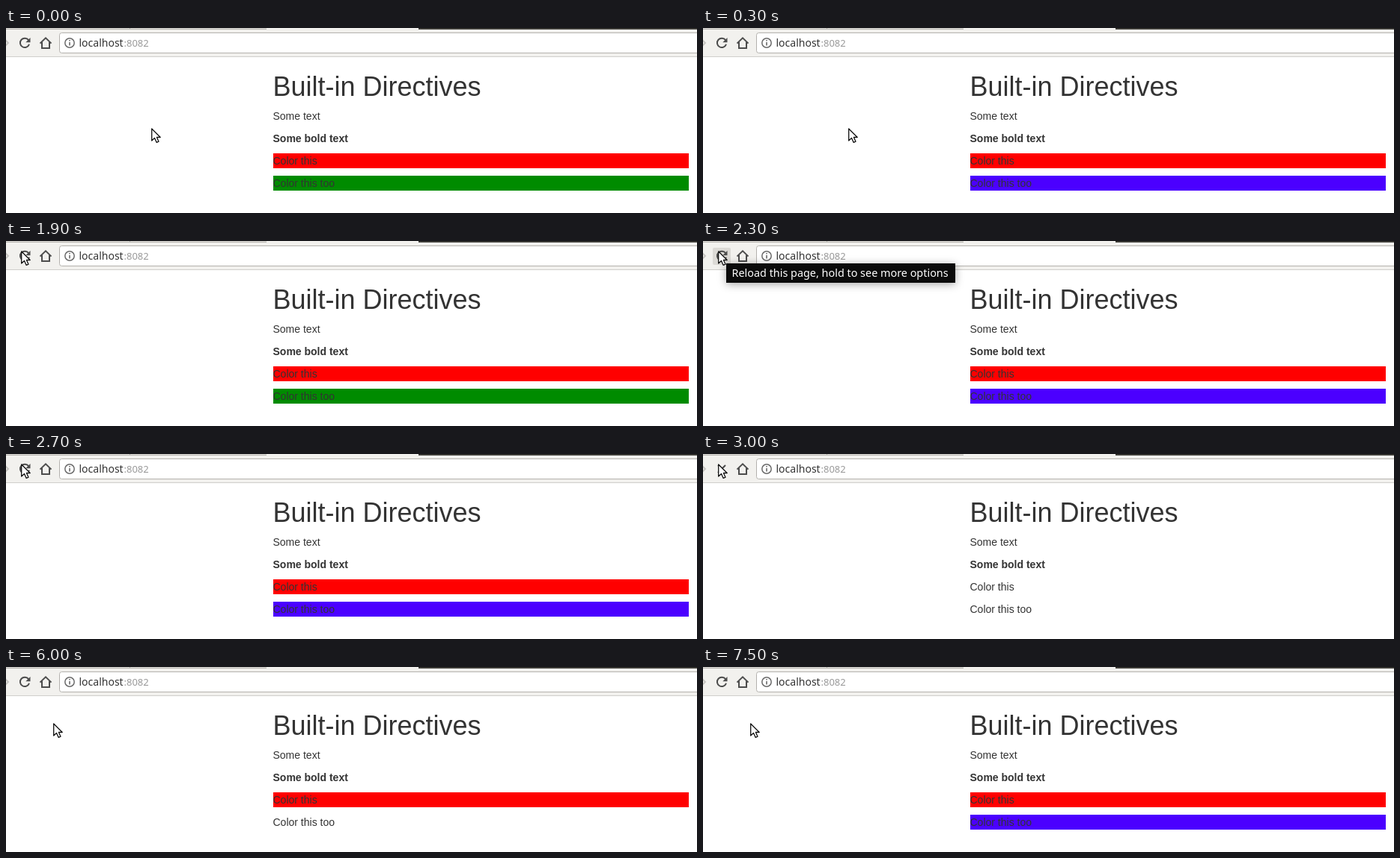
Recreate the animation shown at these times as an HTML page. Size 923x248 px, loop 8 s.

```html
<!DOCTYPE html>
<html lang="en">
<head>
<meta charset="utf-8">
<title>Built-in Directives</title>
<style>
  html, body { margin: 0; width: 100%; height: 100%; overflow: hidden; background: #fff; }
  svg { display: block; width: 923px; height: 248px; }
  .page { font: 14px "Liberation Sans", Arial, sans-serif; fill: #333; }
  .page .title { font-size: 36px; }
  .page .bold { font-weight: bold; }
  .chrome { font-family: "Noto Sans", "Open Sans", sans-serif; }
  .icon { fill: none; stroke: #4c4c4c; stroke-width: 2; }
  #tip rect { filter: drop-shadow(0 2px 6px rgba(0, 0, 0, .35)); }
</style>
</head>
<body>
<svg viewBox="0 0 923 248">
  <rect width="923" height="248" fill="#fff"/>

  <g class="page">
    <rect id="bar1" x="357" y="168" width="555" height="20"/>
    <rect id="bar2" x="357" y="198" width="555" height="20"/>
    <text class="title" x="356.5" y="91">Built-in Directives</text>
    <text x="356.5" y="123">Some text</text>
    <text class="bold" x="356.5" y="153">Some bold text</text>
    <text x="356.5" y="183">Color this</text>
    <text x="356.5" y="213">Color this too</text>
  </g>

  <g class="chrome">
    <rect width="923" height="38" fill="#f2f1ee"/>
    <rect y="38" width="923" height="1" fill="#cfcecb"/>
    <rect width="348" height="1" fill="#dddcd8"/>
    <rect y="1" width="348" height="1" fill="#b4b2ad"/>
    <rect x="165" width="1" height="1" fill="#aaa8a3"/>
    <rect x="551" width="372" height="2" fill="#3c3b37"/>
    <path d="M-3 14L3 20L-3 26" fill="none" stroke="#c6c5c2" stroke-width="2"/>
    <rect id="hover" x="13" y="9" width="24" height="23" rx="2"/>
    <g id="reload">
      <path class="icon" d="M30.1 16.2A6.2 6.2 0 1 0 31 21.8"/>
      <path d="M32.5 13V19.2H26.3Z" fill="#4c4c4c"/>
    </g>
    <path id="stop" class="icon" d="M20 15L30 25M30 15L20 25"/>
    <path class="icon" d="M45.5 20.6L53 13.4L60.5 20.6M48 19V27H58V19"/>
    <rect x="71.5" y="6.5" width="870" height="27" rx="3" fill="#fff" stroke="#b3b1ad"/>
    <circle cx="85" cy="20" r="6.2" fill="none" stroke="#6b6b6b" stroke-width="1.5"/>
    <path d="M85 16V17.6M85 19V23.6" stroke="#6b6b6b" stroke-width="1.6"/>
    <text x="97.5" y="25" font-size="14" fill="#333">localhost</text>
    <text x="157.5" y="25" font-size="13" fill="#999">:8082</text>
  </g>

  <g id="tip" class="chrome">
    <rect x="31" y="30" width="306" height="26" fill="#0b0b0b"/>
    <text x="38.5" y="48" font-size="14.4" fill="#fff">Reload this page, hold to see more options</text>
  </g>

  <g id="cursor">
    <path d="M.7 1V17L4.5 13.5L7.2 19.4L10 18.2L7.4 12.5H12.2Z"
      fill="#fff" stroke="#111" stroke-width="1.3" stroke-linejoin="round"/>
  </g>
</svg>

<script>
const LOOP = 8000;
const $ = id => document.getElementById(id);

// Each track is a list of [start ms, value], held until the next entry.
const first = [[0, "#f00"], [3000, "none"], [6000, "#f00"]];
const second = [
  [0, "#008b00"], [300, "#4b00ff"], [1300, "#008b00"], [2300, "#4b00ff"],
  [3000, "none"], [7500, "#4b00ff"]
];
const hover = [[0, "none"], [2200, "#dcdad6"], [2400, "#d0ceca"], [2700, "none"]];
const tip = [[0, 0], [2200, .5], [2300, 1], [2400, .75], [2500, .5], [2600, .25], [2700, 0]];
const reload = [[0, 1], [3000, 0], [3600, 1]];
const stop = [[0, 0], [3000, 1], [3200, .35], [3600, 0]];
const cursor = [
  [0, [194, 134]], [800, [190, 132]], [900, [177, 126]], [1000, [165, 121]],
  [1200, [135, 111]], [1300, [102, 92]], [1400, [66, 65]], [1500, [47, 50]],
  [1700, [41, 41]], [1800, [28, 23]], [1900, [20, 13]],
  [3600, [23, 19]], [3700, [32, 35]], [3800, [44, 52]], [3900, [54, 64]],
  [4000, [60, 71]], [4100, [62, 73]], [4500, [63, 75]]
];

function at(track, t) {
  let value;
  for (const [start, v] of track) if (t >= start) value = v;
  return value;
}

function draw(t) {
  $("bar1").setAttribute("fill", at(first, t));
  $("bar2").setAttribute("fill", at(second, t));
  $("hover").setAttribute("fill", at(hover, t));
  $("tip").setAttribute("opacity", at(tip, t));
  $("reload").setAttribute("opacity", at(reload, t));
  $("stop").setAttribute("opacity", at(stop, t));
  $("cursor").setAttribute("transform", `translate(${at(cursor, t)})`);
}

const begin = performance.now();
function tick() {
  draw((performance.now() - begin) % LOOP);
  requestAnimationFrame(tick);
}
tick();
</script>
</body>
</html>
```
